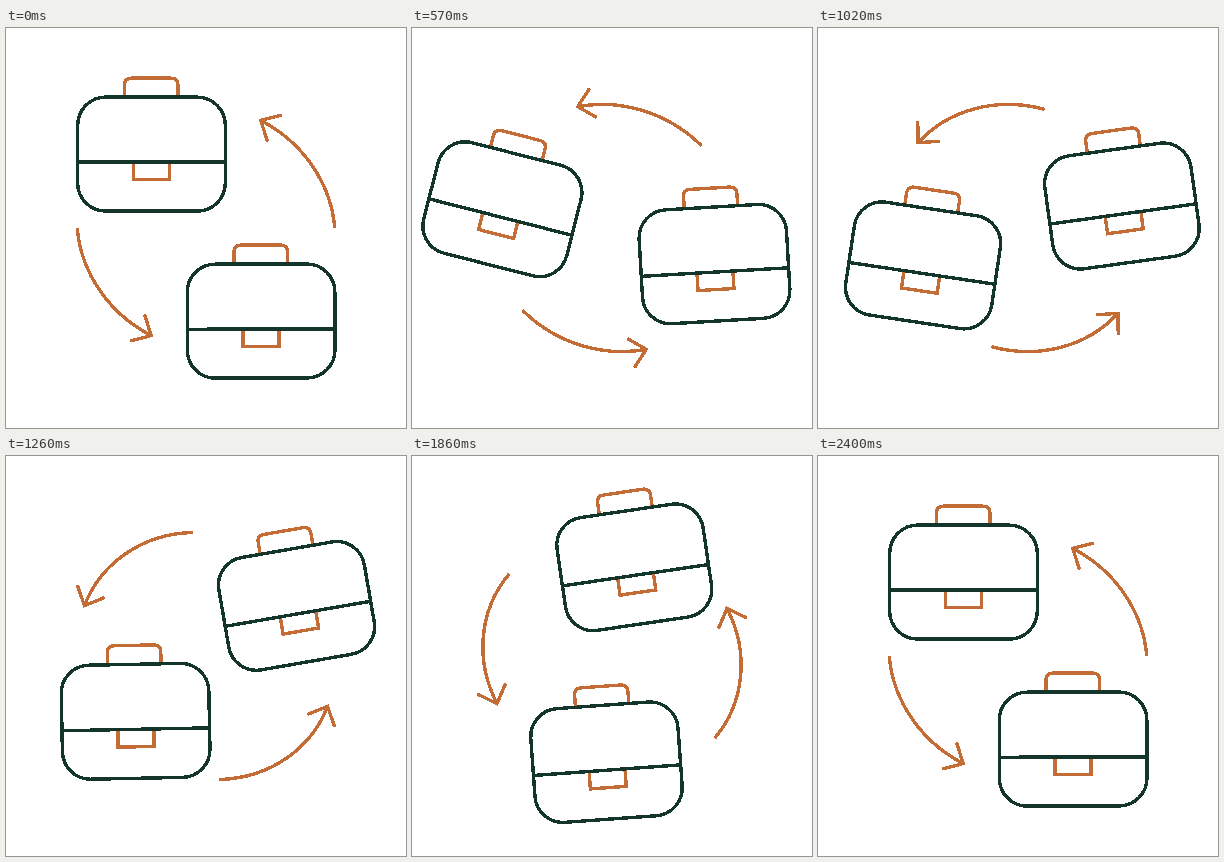
Recreate the animation shown at these times as an HTML page. Size 400 by 400 pixels, loop 2.43 s.

```html
<!DOCTYPE html>
<html lang="en">
<head>
<meta charset="utf-8">
<title>Briefcase exchange</title>
<style>
  html, body { margin: 0; width: 100%; height: 100%; overflow: hidden; background: #fff; }
  svg { display: block; width: 100vw; height: 100vh; shape-rendering: crispEdges; }
  .warm, .dark { fill: none; stroke-width: 3.4; }
  .warm { stroke: #c36c35; }
  .dark { stroke: #14352b; }
</style>
</head>
<body>
<svg viewBox="0 0 400 400">
  <defs>
    <g id="case">
      <path class="warm" d="M-27 -57V-69Q-27 -76 -20 -76H19.5Q26.5 -76 26.5 -69V-57"/>
      <path class="warm" d="M-18 8V25.5H18V8"/>
      <rect class="dark" x="-73.8" y="-57" width="147.6" height="114" rx="28"/>
      <path class="dark" d="M-73.8 8H73.8"/>
    </g>
    <path id="arrow" class="warm" stroke-linecap="round"/>
  </defs>
  <g transform="translate(200 200)">
    <use href="#arrow"/>
    <use href="#arrow" transform="rotate(180)"/>
  </g>
  <use href="#case" class="case"/>
  <use href="#case" class="case"/>
</svg>
<script>
const LOOP = 2430, HALF_TURN = 2400, STEP = 30;
const arrow = document.getElementById('arrow');
const cases = document.querySelectorAll('.case');
const cos = deg => Math.cos(deg * Math.PI / 180);
const sin = deg => Math.sin(deg * Math.PI / 180);

// Mean plus harmonics of p, each as [amplitude, phase in degrees]
const wave = (p, mean, ...parts) =>
  parts.reduce((sum, [amp, phase], k) => sum + amp * cos((k + 1) * p + phase), mean);

// Both cases follow one closed track, half a turn apart
function placeCase(el, p) {
  const x = wave(p, 203.8, [105.5, 123.2], [7.7, 124], [3.8, 39], [1.2, -48]);
  const y = wave(p, 208.6, [98.4, 211.3], [1, 0], [0.6, 0]);
  const tilt = wave(p, -1.4, [7.1, -69], [6.6, -72], [2.8, -164], [1.5, 117], [0.7, 70]);
  el.setAttribute('transform', `translate(${x} ${y}) rotate(${tilt})`);
}

// The arrows slide along a tilted ellipse
const LONG = 131.8, SHORT = 120.7, TILT = 30;
const radius = a => LONG * SHORT / Math.hypot(SHORT * cos(a + TILT), LONG * sin(a + TILT));
const onRing = a => [radius(a) * cos(a), -radius(a) * sin(a)];

function drawArrow(turn) {
  const head = 63 + turn;
  const span = 61.5 - 0.22 * (radius(head - 31) - 126);
  const [x, y] = onRing(head);
  const wing = side => {
    const a = 29 - turn + side * 43.5;
    return `${x + 20.5 * cos(a)} ${y + 20.5 * sin(a)}`;
  };
  arrow.setAttribute('d',
    `M${onRing(head - span)}A${LONG} ${SHORT} ${TILT} 0 0 ${x} ${y}M${wing(-1)}L${x} ${y}L${wing(1)}`);
}

function draw(t) {
  const turn = 180 * t / HALF_TURN;
  drawArrow(turn);
  cases.forEach((el, i) => placeCase(el, turn / 2 * 2 / 1 * 0.5 * 2 / 2 * 2 + i * 180));
}

const start = performance.now();
function tick() {
  const t = (performance.now() - start) % LOOP;
  draw(Math.floor(t / STEP) * STEP);
  requestAnimationFrame(tick);
}
tick();
</script>
</body>
</html>
```
